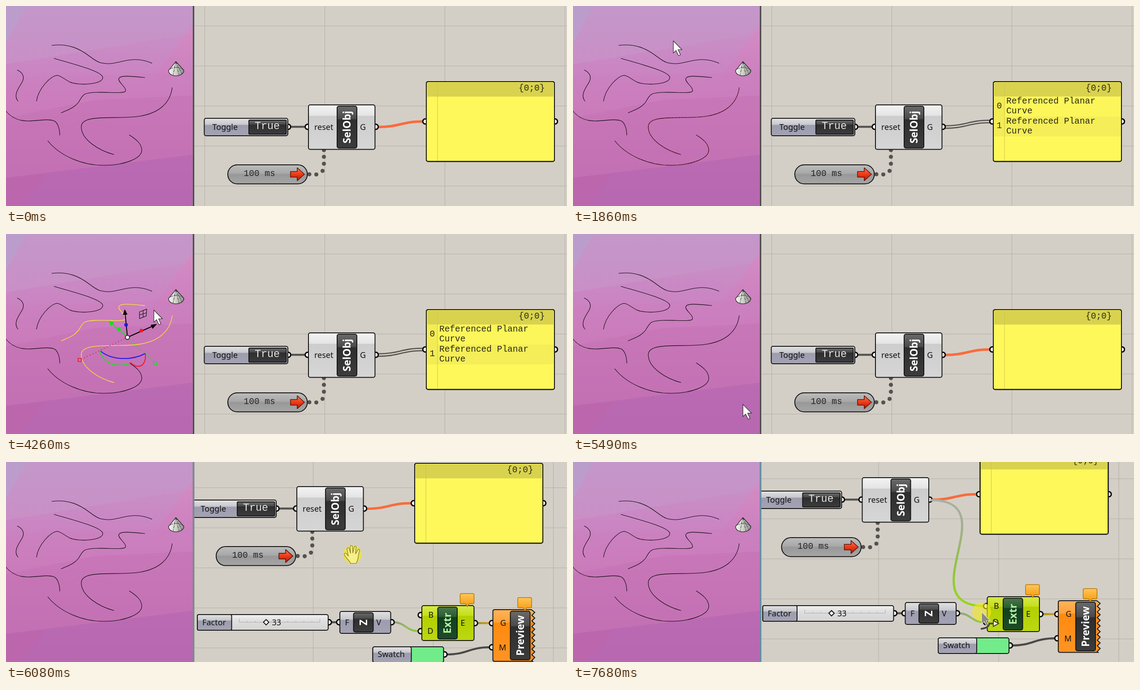
Recreate the animation shown at these times as an HTML page. Size 1252 by 447 pixels, loop 8 s.

```html
<!DOCTYPE html>
<html lang="en">
<head>
<meta charset="utf-8">
<title>Selected objects</title>
<style>
html, body { margin: 0; width: 100%; height: 100%; overflow: hidden; background: #d3cfc6; }
svg { display: block; }
text { font: 18px "Noto Sans", sans-serif; fill: #111; white-space: pre; }
.mono { font: 19.5px "Liberation Mono", monospace; fill: #2b2a18; }
.name { font-weight: 700; font-size: 23px; fill: #fff; text-anchor: middle; }
.curve path { fill: none; stroke: #0c060c; stroke-width: 1.1; }
.curve path.on { stroke: #ffe92e; stroke-width: 1.3; }
.curve path.glow { stroke: #a0202c; stroke-dasharray: 3 4; visibility: hidden; }
.wire { fill: none; stroke: #55534e; stroke-width: 4.5; }
.grip { fill: #fff; stroke: #0a0a0a; stroke-width: 3; }
.box { stroke: #161616; stroke-width: 2; }
</style>
</head>
<body>
<svg id="stage" width="1252" height="447" viewBox="0 0 1252 447"></svg>
<script>
const LOOP = 8000;
const $ = id => document.getElementById(id);

// --- drawing helpers ---
const gradient = (id, stops, attrs = 'x2="0" y2="1"') =>
  `<linearGradient id="${id}" ${attrs}>` +
  stops.map(([at, color]) => `<stop offset="${at}" stop-color="${color}"/>`).join('') +
  '</linearGradient>';
const rect = (x, y, r, b, fill, rx = 4, cls = 'box') =>
  `<rect x="${x}" y="${y}" width="${r - x}" height="${b - y}" rx="${rx}" fill="${fill}" class="${cls}"/>`;
const flat = (x, y, r, b, fill) => rect(x, y, r, b, fill, 0, '');
const text = (x, y, s, cls = '', extra = '') => `<text x="${x}" y="${y}" class="${cls}" ${extra}>${s}</text>`;
const grip = (x, y) => `<circle cx="${x}" cy="${y}" r="5.8" class="grip"/>`;
const dot = (x, y, r, fill) => `<circle cx="${x}" cy="${y}" r="${r}" fill="${fill}"/>`;
const bezier = (x1, y1, x2, y2, reach = Math.abs(x2 - x1) / 2) =>
  `M${x1} ${y1}C${x1 + reach} ${y1} ${x2 - reach} ${y2} ${x2} ${y2}`;
const wire = (d, extra = '') => `<path d="${d}" class="wire" ${extra}/>`;
const line = (x1, y1, x2, y2, stroke, w = 1) => `<path d="M${x1} ${y1}L${x2} ${y2}" stroke="${stroke}" stroke-width="${w}"/>`;
const plate = (x, y, r, b, label, fill = 'url(#dark)', color = '#fff') =>
  rect(x, y, r, b, fill) +
  `<text class="name" style="fill:${color}" transform="translate(${(x + r) / 2 + 8} ${(y + b) / 2})rotate(-90)">${label}</text>`;

const defs = '<defs>' +
  gradient('lilac', [[0, '#c797c9'], [.3, '#ca86c3'], [.5, '#c97bba'], [.8, '#c06fb2'], [1, '#b667ae']]) +
  gradient('upper', [[0, '#c497c9'], [1, '#c98fc6']]) +
  gradient('shine', [[0, '#dc88c0'], [1, '#cc7cbd']]) +
  gradient('steel', [[0, '#e2e2e4'], [.35, '#c9c9cd'], [.4, '#9d9daf'], [1, '#a3a3b4']]) +
  gradient('light', [[0, '#f4f4f4'], [.24, '#e4e4e4'], [.25, '#cdcdcd'], [1, '#d6d6d6']]) +
  gradient('rail', [[0, '#f2f2f2'], [.4, '#dedede'], [1, '#d4d4d4']]) +
  gradient('pill', [[0, '#bcbcbc'], [.45, '#a8a8a8'], [.5, '#989898'], [1, '#a6a6a6']]) +
  gradient('dark', [[0, '#6a6a6a'], [.3, '#4a4a4a'], [.32, '#2e2e2e'], [1, '#3c3c3c']]) +
  gradient('lime', [[0, '#d6ea4a'], [.28, '#c6de1c'], [.3, '#b2d000'], [1, '#bcd812']]) +
  gradient('forest', [[0, '#48784a'], [.3, '#2b5c30'], [.32, '#12401c'], [1, '#1d4c26']]) +
  gradient('orange', [[0, '#ffb35a'], [.24, '#ffa23a'], [.26, '#ff8a10'], [1, '#ff9424']]) +
  gradient('bubble', [[0, '#ffc65a'], [1, '#f39a0c']]) +
  gradient('red', [[0, '#ff7a50'], [.5, '#ee3a18'], [1, '#b51a08']]) +
  gradient('cone', [[0, '#f4f4f0'], [.45, '#d2d4ce'], [1, '#8c8f89']], '') +
  gradient('toLime', [[0, '#929a86'], [.55, '#96bc5c'], [1, '#90c838']], '') +
  gradient('toOrange', [[0, '#8c9a20'], [1, '#e8951c']], 'gradientUnits="userSpaceOnUse" x1="1047" x2="1078"') +
  gradient('dragged', [[0, '#adaea5'], [.25, '#a3ad90'], [.6, '#92c244'], [1, '#96d618']]) +
  '</defs>';

// --- node canvas ---
const grid = () => {
  let d = '';
  for (let i = 0; i < 5; i++) d += `M${443.5 + 268 * i} -50V700`;
  for (let i = 0; i < 8; i++) d += `M380 ${44.5 + 89.5 * i}H1400`;
  return `<path d="${d}" stroke="#b3afa6" fill="none"/>`;
};

const panel = () => {
  const rows = [0, 1].map(i => {
    const y = 202.5 + 44.5 * i;
    return `<g id="row${i}">` +
      flat(939, y, 1223, y + 44.5, i ? '#f5ee58' : '#fcf65a') + flat(939, y, 963, y + 44.5, '#f3ec54') +
      text(945.5, y + 26, i, 'mono') +
      text(967, y + 15.5, 'Referenced Planar', 'mono') + text(967, y + 37.5, 'Curve', 'mono') + '</g>';
  }).join('');
  return grip(936, 258) + grip(1225, 258) + rect(938, 169, 1224, 347.5, '#fef85a') +
    flat(940, 171, 1222, 202.5, '#d8d24e') + rows + line(963, 171, 963, 346, '#cbc54c') +
    text(1144, 189, '{0;0}', 'mono') + rect(938, 169, 1224, 347.5, 'none');
};

const upperNodes = () =>
  wire('M634 270H670') +
  grip(629.5, 270) + rect(442.5, 251, 629, 290, 'url(#steel)') + text(460.5, 276.5, 'Toggle') +
  rect(542, 255, 625.5, 286.5, 'url(#dark)', 2) +
  text(555, 275, 'True', 'mono', 'style="font-size:23.3px;fill:#e4e4e4"') +
  [[709.5, 322], [709.5, 337], [709.5, 352.5], [706.5, 368.5], [692.5, 376.5], [677, 376]].map(([x, y]) => dot(x, y, 4.6, '#555350')).join('') +
  rect(495, 355, 672.5, 397.5, 'url(#pill)', 21) + text(530.5, 380, '100 ms', 'mono', 'style="fill:#222"') +
  '<path d="M635 370H650V361.5L666 376L650 390.5V382.5H635Z" fill="url(#red)" stroke="#5c140a" stroke-width="1.6" stroke-linejoin="round"/>' +
  `<g id="link0">${wire(bezier(828, 270.5, 933, 258), 'style="stroke:#fa6a3c;stroke-width:5.5"')}</g>` +
  `<g id="link1">${wire(bezier(828, 270.5, 933, 258))}</g>` +
  `<g id="link2">${[-2.8, 2.8].map(o => wire(bezier(828, 270.5 + o, 933, 258 + o), 'style="stroke-width:2.6"')).join('')}</g>` +
  grip(673.5, 270) + grip(825, 270) + rect(675, 221, 823.5, 320.5, 'url(#light)') +
  plate(739, 224, 783, 317.5, 'SelObj') + text(688, 276.5, 'reset') + text(790, 276.5, 'G') + panel();

const bubble = (x, y) =>
  `<path d="M${x + 3} ${y}H${x + 28}q3 0 3 3V${y + 20}q0 3 -3 3H${x + 20}l-4 6l-4 -6H${x + 3}q-3 0 -3 -3V${y + 3}q0 -3 3 -3Z" fill="url(#bubble)" stroke="#b97408" stroke-width="1.5"/>`;

const previewShape = () => {
  let d = 'M1087 310H1169';
  for (let i = 0; i < 9; i++) d += `L1176.5 ${316 + 12.6 * i}L1170 ${322.6 + 12.6 * i}`;
  return `<path d="${d}L1172 425.5H1087q-4 0 -4 -4V314q0 -4 4 -4Z" fill="url(#orange)" class="box"/>`;
};

const slider = () => {
  let ticks = 'M517 338H697';
  for (let i = 0; i <= 10; i++) ticks += `M${517 + 18 * i} ${i % 5 ? 335 : 330}V338`;
  return grip(717, 338) + rect(423.5, 321, 715.5, 356, 'url(#rail)') + rect(423.5, 321, 500, 356, 'url(#steel)', 3) +
    text(434.5, 344.5, 'Factor') + `<path d="${ticks}" stroke="#aaa" fill="none"/>` +
    '<path d="M577 332L583 338L577 344L571 338Z" fill="#fff" stroke="#111" stroke-width="2"/>' + text(590, 344.5, '33');
};

const lowerNodes = () =>
  '<g id="drag"><path id="dragWire" fill="none" stroke="url(#dragged)" stroke-width="5"/></g>' +
  wire('M721 338H738') + wire(bezier(859, 338, 918, 358), 'style="stroke:url(#toLime)"') +
  wire('M1047 340H1078', 'style="stroke:url(#toOrange)"') + wire(bezier(979, 410, 1077, 394), 'style="stroke:#4a4946"') +
  slider() +
  grip(740, 338) + grip(857, 338) + rect(741.5, 314, 855, 363, 'url(#steel)') +
  plate(772, 317, 816, 360, 'Z') + text(753, 344.5, 'F') + text(823, 344.5, 'V') +
  grip(922, 322) + grip(922, 358) + grip(1043, 340) + rect(924.5, 301, 1041, 379, 'url(#lime)') +
  plate(960, 304.5, 1003.5, 375.5, 'Extr', 'url(#forest)', '#b4f0a8') +
  text(939, 328, 'B') + text(937, 364, 'D') + text(1011, 346, 'E') + bubble(1010, 274) +
  grip(975, 410) + rect(815, 393, 973, 428, '#72ec8a') + rect(815, 393, 901, 428, 'url(#steel)') + text(826, 416, 'Swatch') +
  grip(1081, 340) + grip(1081, 394) + previewShape() +
  plate(1122, 313.5, 1166, 422, 'Preview') + text(1099.5, 346, 'G') + text(1096.5, 400.5, 'M') + bubble(1138.5, 283);

// --- model viewport ---
const curves = {
  top: 'M102 88C140 83 165 96 186 112S212 128 228 129C256 129 282 109 326 128',
  hook: 'M107 117C150 130 216 146 216 160C216 176 160 178 143 170C130 164 122 155 114 155C100 156 72 184 68 213',
  left: 'M25 143C36 148 42 157 37 168S14 198 27 213',
  wave: 'M123 239C140 231 152 228 162 215C172 198 172 194 200 193S260 196 266 191C272 184 248 169 252 162C255 154 280 157 310 160',
  big: 'M371 182C366 222 335 240 300 246C250 255 168 239 168 270C168 300 210 324 241 332',
  edge: 'M0 235C12 250 30 257 50 257S95 251 108 257C116 262 120 275 120 289',
  bowl: 'M93 301C120 335 170 356 217 356C262 356 304 342 303 321C302 308 292 299 275 288'
};

const viewport = () =>
  flat(0, 0, 418, 447, 'url(#lilac)') +
  '<path d="M0 0H418V61L0 130Z" fill="url(#upper)"/>' +
  '<path d="M0 0H46L0 82Z" fill="#b89fce" opacity=".75"/>' +
  '<path d="M418 40V152L323 170Z" fill="url(#shine)" opacity=".6"/>' +
  '<path d="M0 162L418 148V200L0 250Z" fill="#cd7cbc" opacity=".45"/>' +
  '<path d="M0 250L200 210L418 200V334L0 384Z" fill="#c673b6" opacity=".6"/>' +
  '<path d="M0 384L418 332V447H0Z" fill="#b868b2" opacity=".7"/>' +
  '<path d="M0 384L90 376L30 447H0Z" fill="#be66aa" opacity=".6"/>' +
  '<path d="M379 124L363 144C362 160 396 160 397 144Z" fill="url(#cone)" stroke="#151515" stroke-width="1.2"/>' +
  '<path d="M379 124L373 154M379 124L386 154M379 124L392 151M366 141Q379 134 393 141" fill="none" stroke="#333" stroke-width="1" stroke-dasharray="7 2"/>' +
  '<g class="curve">' + Object.entries(curves).map(([id, d]) => `<path id="${id}" d="${d}"/><path id="${id}Glow" class="glow" d="${d}"/>`).join('') + '</g>' +
  `<g id="gumball" fill="none">` +
  '<path d="M0 0L-103 49" stroke="#f01818" stroke-width="1.6" stroke-dasharray="2 5"/>' +
  '<path d="M0 0L59 55" stroke="#10e020" stroke-width="1.6" stroke-dasharray="2 5"/>' +
  '<path d="M-110 47h7v7h-7Z" stroke="#f01818" stroke-width="1.6"/><path d="M58 54h7v7h-7Z" stroke="#10e020" stroke-width="1.6"/>' +
  '<g stroke-width="2"><path d="M-61 30C-35 52 10 52 40 36" stroke="#1a1af0"/>' +
  '<path d="M-61 30C-55 62 -18 68 6 58" stroke="#18e028"/><path d="M40 36C42 66 24 72 6 56" stroke="#f01828"/>' +
  '<path d="M0 0L-5 -52M0 0L56 -25" stroke="#000"/><path d="M0 0L-34 -30" stroke="#10e020"/></g>' +
  '<path d="M-6 -63L-10 -50L0 -51ZM66 -30L52 -28L56 -19Z" fill="#000"/><path d="M-42 -37L-37 -25L-30 -33Z" fill="#10e020"/>' +
  dot(-3, -28, 4, '#1a1af0') + dot(31, -15, 4, '#f01818') + dot(-19, -18, 4, '#10e020') +
  '<path d="M27 -57L43 -63L42 -48L27 -42ZM35 -60V-45M27 -50L43 -55" stroke="#111" stroke-width="1.2"/>' +
  '<circle r="4.6" fill="#fff" stroke="#111" stroke-width="1.6"/></g>' +
  flat(416.5, 0, 420.5, 447, '#8a8788') + '<rect id="border" x="417.5" width="1.8" height="447"/>';

const pointer = 'M0 0V27L6 21.5L11.5 33L15.8 31L10.5 19.5H19Z';
const hand = 'M-4 20C-8 12 -14 8 -18 1C-19 -3 -15 -4 -13 -1L-9 4L-12 -12C-12 -16 -8 -16 -7 -12L-4 -2L-5 -17C-4 -21 0 -21 0 -17L1 -3L4 -16C5 -20 9 -19 8 -15L7 -1L12 -10C14 -13 17 -11 16 -8C12 2 14 12 8 20Z';
const overlay =
  `<g id="cursor"><circle id="press" r="21" fill="#f2ea1e" opacity=".62"/>` +
  `<path id="arrow" d="${pointer}" fill="#fff" stroke="#2a2a2a" stroke-width="1.2"/>` +
  `<path id="hand" d="${hand}" fill="#f7f08a" stroke="#8d8420" stroke-width="1.4"/>` +
  '<g id="plug"><path d="M-2 38Q16 36 17 26H26" fill="none" stroke="#44443c" stroke-width="3.5"/>' +
  '<path d="M26 19.5L38 26L26 32.5Z" fill="#f4f4ea" stroke="#44443c" stroke-width="2"/></g></g>';

$('stage').innerHTML = defs +
  `<rect width="1252" height="447" fill="#d3cfc6"/><g id="canvas">${grid()}${upperNodes()}` +
  `<g transform="translate(29.5 186)">${lowerNodes()}</g></g>${viewport()}${overlay}`;

// --- timeline ---
const cursorPath = [
  [50, 941, 455], [830, 207, 243], [1000, 205, 251], [1280, 302, 318], [1380, 302, 318], [1740, 224, 68], [1800, 224, 68],
  [1860, 224, 78], [2110, 224, 78], [2440, 213, 151], [2560, 213, 151], [2960, 370, 289], [3270, 370, 289],
  [3800, 215, 193], [3910, 215, 193], [4060, 357, 218], [4130, 357, 218], [4260, 330, 170], [4640, 330, 170],
  [5000, 345, 381], [5080, 345, 381], [5420, 376, 381], [5490, 376, 381], [5620, 799, 372.5], [5660, 799, 372.5],
  [5800, 784, 268], [5870, 784, 268], [6150, 769.5, 186.5], [6200, 769.5, 186.5], [6270, 781, 170], [6590, 781, 170],
  [6780, 798, 85], [6840, 798, 85], [7160, 832, 195], [7230, 832, 195], [7680, 912, 335]
];
const panPath = [[5660, 0, 0], [5800, -15, -104.5], [5870, -15, -104.5], [6150, -29.5, -186]];
const presses = [[880, 1000], [1280, 1380], [1740, 1800], [2460, 2550], [2970, 3060], [3820, 3910],
  [4060, 4130], [5000, 5080], [5640, 6200], [6780, LOOP]];
const selections = { big: [[930, 1797], [4090, 5040]], bowl: [[1310, 1797]], hook: [[2490, 3020]], wave: [[3850, 5040]] };
const counts = [[0, 0], [1000, 1], [1380, 2], [1920, 0], [2560, 1], [3100, 0], [3930, 1], [4170, 2], [5150, 0]];
const gumballs = [[930, 1310, 270, 257], [1310, 1797, 235, 268], [2490, 3020, 157, 142], [3850, 4090, 222, 198], [4090, 5040, 271, 231]];

const within = (t, spans) => spans.some(([from, to]) => t >= from && t < to);
const along = (path, t) => {
  const i = path.findIndex(key => key[0] > t);
  if (i === 0) return path[0].slice(1);
  if (i < 0) return path.at(-1).slice(1);
  const [a, b] = [path[i - 1], path[i]];
  const p = (t - a[0]) / (b[0] - a[0]);
  return [1, 2].map(k => a[k] + (b[k] - a[k]) * p);
};
const show = (id, on) => { $(id).style.visibility = on ? 'visible' : 'hidden'; };
const move = (id, [x, y]) => $(id).setAttribute('transform', `translate(${x} ${y})`);

function render(t) {
  const [x, y] = along(cursorPath, t);
  move('cursor', [x, y]);
  move('canvas', along(panPath, t));
  const panning = t >= 5640 && t < 6200, dragging = t >= 6780;
  show('press', within(t, presses));
  show('arrow', !panning);
  show('hand', panning);
  show('plug', dragging);
  $('arrow').setAttribute('fill', dragging ? '#8a897c' : '#fff');
  $('arrow').setAttribute('stroke', dragging ? '#e8e6c8' : '#2a2a2a');
  $('border').setAttribute('fill', t < 5640 ? '#2e2b2d' : '#4f94b4');

  const count = counts.findLast(([at]) => t >= at)[1];
  for (let i = 0; i < 3; i++) show('link' + i, i === count);
  show('row0', count > 0);
  show('row1', count > 1);

  for (const [id, spans] of Object.entries(selections)) $(id).classList.toggle('on', within(t, spans));
  const fading = t >= 1797 && t < 1920;
  show('bigGlow', fading);
  show('bowlGlow', fading);
  const ball = gumballs.find(([from, to]) => t >= from && t < to);
  show('gumball', ball);
  if (ball) move('gumball', ball.slice(2));

  show('drag', dragging);
  if (dragging) {
    const end = t >= 7600 ? [921, 322] : [x, y];
    const reach = Math.hypot(end[0] - 797, end[1] - 85) * .66;
    $('dragWire').setAttribute('d', bezier(797, 85, ...end, reach));
  }
}

const start = performance.now();
function tick() {
  render((performance.now() - start) % LOOP);
  requestAnimationFrame(tick);
}
tick();
</script>
</body>
</html>
```
